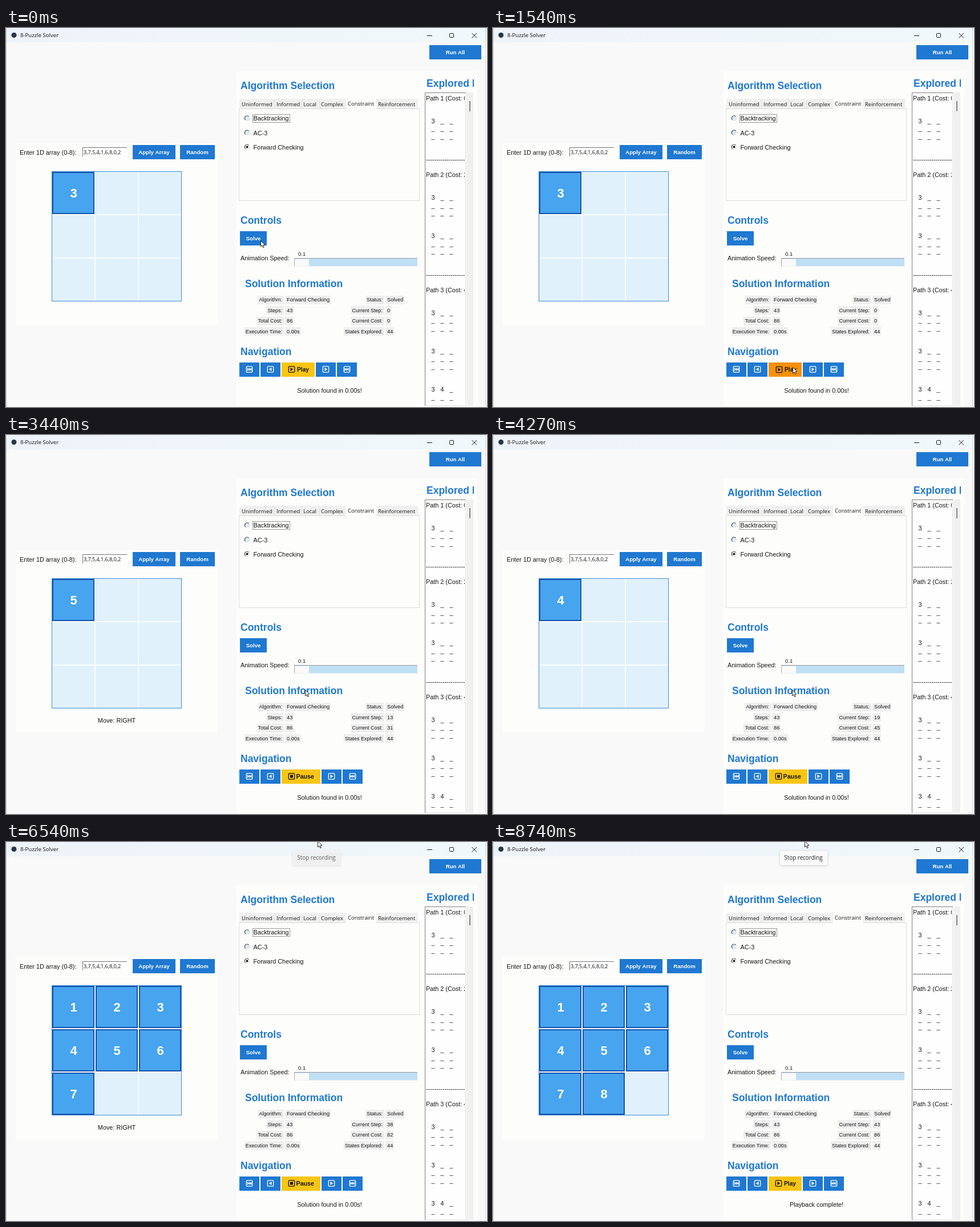
These frames come from a looping animation (843x664 px, 8770 ms). An HTML page with a canvas:

```html
<!DOCTYPE html>
<html lang="en">
<head>
<meta charset="utf-8">
<title>8-Puzzle Solver</title>
<style>
html, body { margin: 0; width: 100%; height: 100%; overflow: hidden; background: #f9f9f9; }
canvas { display: block; }
</style>
</head>
<body>
<canvas id="stage" width="843" height="664"></canvas>
<script>
const g = document.getElementById('stage').getContext('2d');
const LOOP = 8770, FIRST = 1825, STEP = 123, LAST = 43;
const CLICK = 1720, DONE = 7230;
const BLUE = '#1f78d1', INK = '#151515';
const SANS = '"Liberation Sans", Arial, sans-serif';
const UI = '"Open Sans", "Noto Sans", sans-serif';

// Leading value of each attempt, then how many tiles are placed at each step
const attempts = [[3, '1122333'], [7, '11222'], [5, '112233'], [4, '1122333'], [1, '1112223344566777788']];
const boards = attempts.flatMap(([head, counts]) => [...counts].map(n => [head, +n]));
const costs = [[0, 0], [13, 31], [19, 45], [31, 68], [38, 82], [43, 86]];
const pointerPath = [[0, 446, 372], [350, 446, 372], [1250, 525, 594], [1950, 525, 594],
  [2450, 524, 446], [5150, 524, 446], [5600, 546, -2]];

const clamp = (v, a, b) => Math.min(b, Math.max(a, v));
const ease = u => u * u * (3 - 2 * u);

// Interpolates rows of [key, ...values]
function track(rows, key, curve = u => u) {
  const i = rows.findIndex(r => r[0] > key);
  if (i < 0) return rows[rows.length - 1].slice(1);
  const a = rows[i - 1], b = rows[i], u = curve((key - a[0]) / (b[0] - a[0]));
  return a.slice(1).map((v, k) => v + (b[k + 1] - v) * u);
}

function box(x, y, w, h, fill, line, width = 1) {
  g.fillStyle = fill;
  g.fillRect(x, y, w, h);
  if (!line) return;
  g.strokeStyle = line;
  g.lineWidth = width;
  g.strokeRect(x + width / 2, y + width / 2, w - width, h - width);
}

// y is the middle of the capitals
function text(s, x, y, size = 10.85, { color = INK, bold, font = SANS, align = 'left' } = {}) {
  g.font = `${bold ? 'bold ' : ''}${size}px ${font}`;
  g.textAlign = align;
  g.fillStyle = color;
  g.fillText(s, x, y + size * 0.36);
  return g.measureText(s).width;
}

function lines(points, color, width = 1) {
  g.beginPath();
  points.forEach(([x, y], i) => i ? g.lineTo(x, y) : g.moveTo(x, y));
  g.strokeStyle = color;
  g.lineWidth = width;
  g.stroke();
}

function shape(points, fill) {
  g.beginPath();
  points.forEach(p => g.lineTo(...p));
  g.closePath();
  g.fillStyle = fill;
  g.fill();
}

const heading = (s, x, y) => text(s, x, y, 17.5, { bold: true, color: BLUE });

function button(s, x, y, w, h = 25) {
  box(x, y, w, h, BLUE);
  text(s, x + w / 2, y + h / 2, 9.6, { bold: true, color: '#fff', align: 'center' });
}

function icon(kind, x, y, color) {
  g.save();
  g.translate(x, y);
  g.strokeStyle = color;
  g.lineWidth = 1.3;
  g.beginPath();
  g.roundRect(-5.2, -5.2, 10.4, 10.4, 1.5);
  g.stroke();
  if (kind == 'first' || kind == 'back') g.scale(-1, 1);
  const tri = (a, b, h) => shape([[a, -h], [b, 0], [a, h]], color);
  if (kind == 'stop') box(-2.5, -2.5, 5, 5, color);
  else if (kind == 'back' || kind == 'play') tri(-2, 2.8, 3);
  else {
    tri(-4, -0.5, 2.8);
    tri(-0.8, 2.7, 2.8);
    box(2.5, -2.8, 1.2, 5.6, color);
  }
  g.restore();
}

function drawWindow() {
  box(0, 0, 843, 664, '#f9f9f9');
  const bar = g.createLinearGradient(0, 0, 843, 0);
  bar.addColorStop(0, '#eef3f9');
  bar.addColorStop(1, '#f0f8fb');
  box(0, 0, 843, 25, bar);
  box(0, 0, 1, 664, '#c9cdd1');
  box(840, 0, 1, 664, '#d5d8dc');
  box(841, 25, 2, 639, '#fdfdfd');
  g.beginPath();
  g.arc(14, 12.5, 4.5, 0, 7);
  g.fillStyle = '#27364a';
  g.fill();
  text('8-Puzzle Solver', 25, 13, 9.6, { font: UI });
  box(738, 13, 9, 1, INK);
  g.strokeStyle = INK;
  g.lineWidth = 1;
  g.beginPath();
  g.roundRect(777.5, 9.5, 7, 7, 1);
  g.stroke();
  lines([[816.5, 9], [825, 17.5]], INK);
  lines([[825, 9], [816.5, 17.5]], INK);
  button('Run All', 742, 30, 91);
  box(17, 202, 354, 320, '#fdfdfc');
  box(404, 76, 422, 588, '#fdfdfc');
}

function drawBoard(step) {
  text('Enter 1D array (0-8):', 24, 218);
  box(134, 209, 78, 16, '#fefefe');
  box(134, 209, 78, 1, '#777');
  box(134, 209, 1, 16, '#777');
  text('3,7,5,4,1,6,8,0,2', 136, 217.5, 9.2, { font: UI });
  button('Apply Array', 222, 205, 75);
  button('Random', 305, 205, 61);

  box(80, 251, 228, 228, '#f8fcfe', '#3b8cd8');
  const [head, count] = boards[step];
  for (let i = 0; i < 9; i++) {
    const x = 81 + i % 3 * 76, y = 252 + Math.floor(i / 3) * 76;
    if (i < count) {
      box(x, y, 74, 74, '#47a4ee', '#1552ac', 2);
      text(head + i, x + 37.5, y + 37, 22, { bold: true, color: '#fff', align: 'center' });
    } else box(x, y, 74, 74, '#e1f1fb');
  }
  if (step % 5 == 3 && step < LAST) text('Move: RIGHT', 194, 500, 10.85, { align: 'center' });
}

function drawAlgorithms() {
  heading('Algorithm Selection', 411, 101);
  box(409, 124, 313, 18, '#f0f0f0');
  box(408, 141, 317, 162, '#fdfdfc', '#dcdcdc');
  box(596, 121, 53, 22, '#fdfdfc');
  const tabs = { Uninformed: 413, Informed: 474, Local: 521, Complex: 552, Constraint: 599, Reinforcement: 652 };
  for (const [name, x] of Object.entries(tabs))
    text(name, x, name == 'Constraint' ? 132.5 : 133.5, 9.5, { font: UI });
  for (const x of [470, 518, 549]) box(x, 125, 1, 16, '#e2e2e2');

  ['Backtracking', 'AC-3', 'Forward Checking'].forEach((name, i) => {
    const y = 158.5 + i * 25.3;
    const ring = (from, to, color) => {
      g.beginPath();
      g.arc(422.5, y - 0.5, 4.2, from, to);
      g.strokeStyle = color;
      g.lineWidth = 1.3;
      g.stroke();
    };
    g.beginPath();
    g.arc(422.5, y - 0.5, 4, 0, 7);
    g.fillStyle = i < 2 ? '#d9edf8' : '#fff';
    g.fill();
    ring(-0.8, 2.3, '#e2e2e2');
    ring(2.3, 5.5, '#555');
    if (i == 2) {
      g.beginPath();
      g.arc(422.5, y - 0.5, 2, 0, 7);
      g.fillStyle = INK;
      g.fill();
    }
    text(name, 433.5, y);
  });
  g.setLineDash([1, 1]);
  g.strokeStyle = '#333';
  g.lineWidth = 1;
  g.strokeRect(432.5, 151.5, 65, 14);
  g.setLineDash([]);
}

function drawControls() {
  heading('Controls', 411, 337);
  button('Solve', 410, 356, 47, 25);
  text('Animation Speed:', 411, 403);
  text('0.1', 512, 396, 9.5);
  box(505, 403, 216, 15, '#bfdff5');
  box(505, 403, 216, 1, '#999');
  box(505, 403, 1, 15, '#aaa');
  box(505, 417, 216, 1, '#eee');
  box(506, 405, 25, 12, '#fafafa');
}

function drawInfo(step) {
  heading('Solution Information', 419, 448);
  const cost = Math.round(track(costs, step)[0]);
  const rows = [
    ['Algorithm:', 'Forward Checking', 'Status:', 'Solved'],
    ['Steps:', '43', 'Current Step:', step],
    ['Total Cost:', '86', 'Current Cost:', cost],
    ['Execution Time:', '0.00s', 'States Explored:', '44']];
  const cell = (s, x, y, size, align) => {
    g.font = `${size}px ${SANS}`;
    const w = g.measureText(s).width;
    box(Math.round(align == 'right' ? x - w - 2 : x - 3), Math.round(y - 7.5), Math.round(w + 5), 15, '#efefef');
    text(s, x, y, size, { align });
  };
  rows.forEach((row, i) => row.forEach((s, k) =>
    cell(s, [484, 492, 660, 668][k], 476 + i * 18.5, k % 2 ? 9.25 : 9, k % 2 ? 'left' : 'right')));
}

function drawNavigation(t, px, py) {
  heading('Navigation', 411, 567);
  const playing = t >= CLICK && t < DONE, wide = playing ? 68 : 58;
  const hover = px >= 483 && px < 483 + wide && py >= 586 && py < 611;
  const nav = (kind, x) => {
    box(x, 586, 35, 25, BLUE);
    icon(kind, x + 17.5, 598, '#fff');
  };
  nav('first', 409);
  nav('back', 446);
  box(483, 586, wide, 25, hover ? '#f69008' : '#f9c513');
  const shift = hover ? 1 : 0;
  icon(playing ? 'stop' : 'play', 500.5 + shift, 598 + shift / 2, INK);
  text(playing ? 'Pause' : 'Play', (playing ? 508.5 : 510) + shift, 598 + shift / 2, playing ? 10.7 : 10.2, { bold: true });
  nav('play', 485 + wide);
  nav('last', 522 + wide);
  text(t < DONE ? 'Solution found in 0.00s!' : 'Playback complete!', 567, 635, 10.85, { align: 'center' });
}

function drawPaths() {
  g.save();
  g.beginPath();
  g.rect(730, 76, 90, 588);
  g.clip();
  heading('Explored Paths', 737, 97);
  box(734, 113, 72, 549, '#fefefe', '#e3e3e3');
  box(734, 113, 72, 1, '#808080');
  box(734, 113, 1, 549, '#808080');
  box(807, 113, 12, 549, '#f0f0f0');
  box(812, 128, 2, 18, '#858585');
  g.beginPath();
  g.rect(735, 114, 69, 547);
  g.clip();
  const at = line => 122.6 + line * 13.44;
  const state = (line, tiles) => {
    for (let i = 0; i < 9; i++)
      text(tiles[i] || '_', 745.5 + i % 3 * 16, at(line + Math.floor(i / 3)));
  };
  [0, 10, 25].forEach((line, i) => text(`Path ${i + 1} (Cost: ${i * 2})`, 736, at(line)));
  [8, 23].forEach(line => text('-'.repeat(24), 736, at(line)));
  [3, 13, 18, 28, 33].forEach(line => state(line, '3'));
  state(38, '34');
  g.restore();
}

function drawTooltip(t) {
  g.save();
  g.globalAlpha = clamp((t - 6400) / 200, 0, 1);
  g.shadowColor = 'rgba(0,0,0,.18)';
  g.shadowBlur = 4;
  g.shadowOffsetY = 1;
  g.beginPath();
  g.roundRect(503, 15.5, 83, 25, 3);
  g.fillStyle = '#f9f9f9';
  g.fill();
  g.shadowColor = 'transparent';
  text('Stop recording', 544, 27.5, 9.9, { font: UI, color: '#262626', align: 'center' });
  g.restore();
}

function drawPointer(x, y) {
  g.save();
  g.translate(x + 0.5, y + 0.5);
  shape([[0, 0], [0, 10.5], [2.4, 8.3], [4.1, 12.2], [5.8, 11.4], [4.2, 7.7], [7.4, 7.4]], '#fff');
  g.strokeStyle = '#111';
  g.lineWidth = 0.9;
  g.stroke();
  g.restore();
}

function draw(now) {
  const t = now % LOOP;
  const step = clamp(Math.floor((t - FIRST) / STEP), 0, LAST);
  const [px, py] = track(pointerPath, t, ease);
  drawWindow();
  drawBoard(step);
  drawAlgorithms();
  drawControls();
  drawInfo(step);
  drawNavigation(t, px, py);
  drawPaths();
  if (t > 6400) drawTooltip(t);
  drawPointer(px, py);
}

const start = performance.now();
function tick() {
  draw(performance.now() - start);
  requestAnimationFrame(tick);
}
tick();
</script>
</body>
</html>
```
